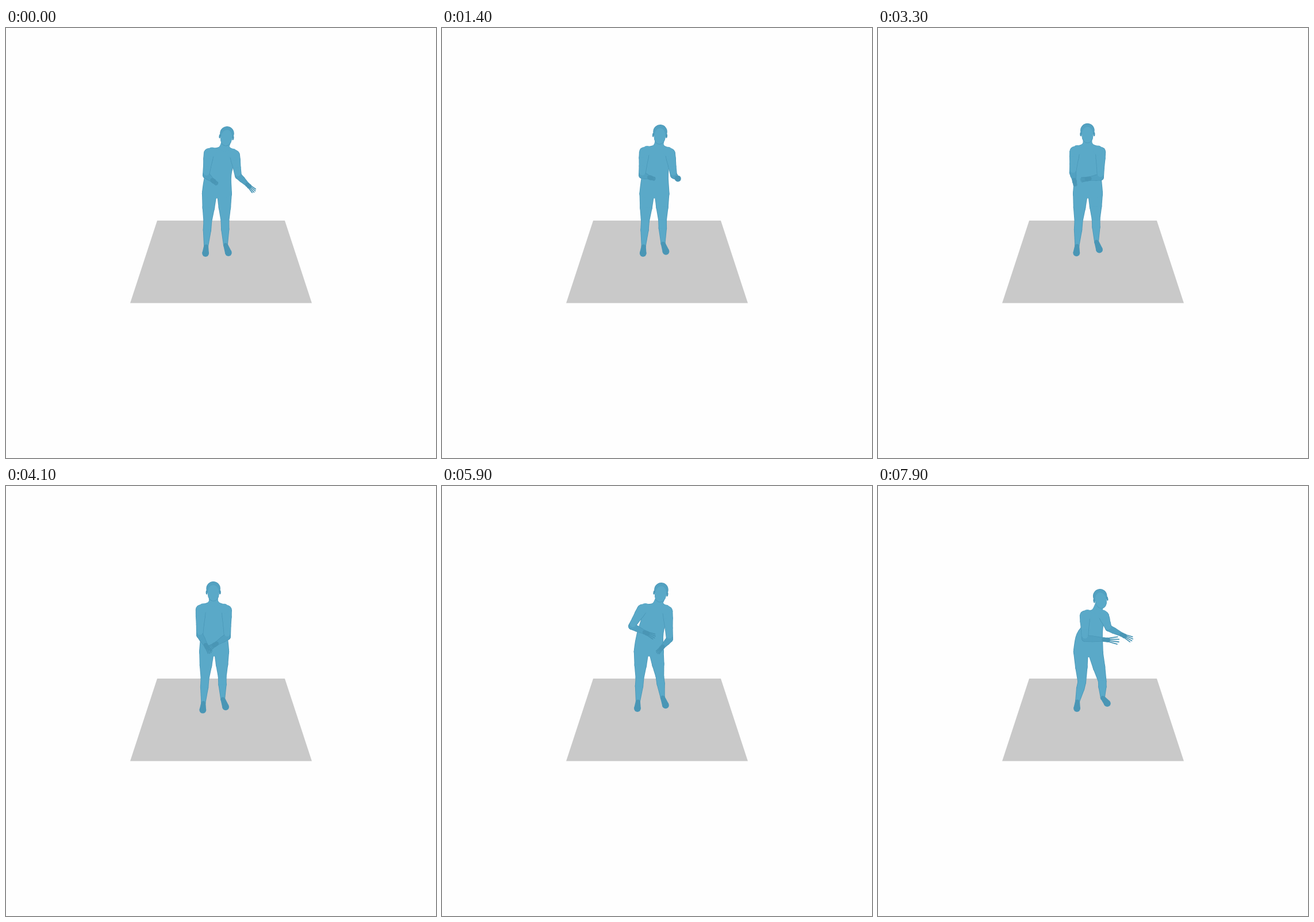
Animation, 748 px wide and 748 px high, one loop 8000 ms. Source, as an HTML page with a canvas:

```html
<!DOCTYPE html>
<html lang="en">
<head>
<meta charset="utf-8">
<title>Figure</title>
<style>
html, body { margin: 0; height: 100%; overflow: hidden; background: #fefefe; }
canvas { display: block; }
</style>
</head>
<body>
<canvas id="stage" width="748" height="748"></canvas>
<script>
const g = document.getElementById('stage').getContext('2d');
const SKIN = '#5aa9c8', RIM = '#4b98b8', SHADE = '#52a1c1', DARK = '#4a96b5';
const LOOP = 8000, STEP = 100;

// Key points of the gesture; all other joints follow by rule
const TIMES = [0, 1400, 2500, 4100, 5900, 6900, 7900];
const KEYS = {
  neck:   [[380, 207], [377, 204], [371, 202], [361, 202], [376, 204], [372, 204], [382, 215]],
  elbowL: [[348, 256], [348, 256], [341, 243], [337, 259], [330, 244], [347, 247], [360, 265]],
  tipL:   [[368, 272], [371, 263], [337, 256], [356, 291], [371, 263], [405, 257], [420, 269]],
  elbowR: [[404, 257], [403, 256], [392, 257], [385, 262], [396, 266], [396, 246], [401, 247]],
  tipR:   [[433, 285], [414, 265], [364, 247], [351, 284], [374, 291], [416, 284], [443, 268]]
};

const add = (p, x, y) => [p[0] + x, p[1] + y];
const mix = (a, b, k) => [a[0] + (b[0] - a[0]) * k, a[1] + (b[1] - a[1]) * k];
const ease = (t, from, to) => {
  const u = Math.min(1, Math.max(0, (t - from) / (to - from)));
  return u * u * (3 - 2 * u);
};

// Smooth curve through the keys; open ends keep the speed of their section
function sample(keys, t) {
  const last = TIMES.length - 1;
  let i = 0;
  while (i < last - 1 && t >= TIMES[i + 1]) i++;
  const span = TIMES[i + 1] - TIMES[i], u = (t - TIMES[i]) / span;
  return [0, 1].map(axis => {
    const at = k => keys[k][axis], a = at(i), b = at(i + 1);
    const slope = k => k < 1 || k >= last ? b - a :
      (at(k + 1) - at(k - 1)) / (TIMES[k + 1] - TIMES[k - 1]) * span;
    const m = slope(i), n = slope(i + 1);
    return a + u * (m + u * (3 * (b - a) - 2 * m - n + u * (2 * (a - b) + m + n)));
  });
}

function poseAt(t) {
  const p = {};
  for (const name in KEYS) p[name] = sample(KEYS[name], t);
  const turn = ease(t, 5500, 7900), step = ease(t, 4100, 6900);

  // The weight sways from foot to foot while the chest leans over the hips
  const sway = 364.5 + 5 * Math.cos((t - 1400) / 8200 * 2 * Math.PI);
  const lean = p.neck[0] - sway, half = 22.5 - 6 * turn;
  p.tilt = lean * .011 * (1 - 2 * turn);
  p.head = add(p.neck, lean * .3, -20);
  p.shL = add(p.neck, -lean * .35 - half, 13 - lean * .15);
  p.shR = add(p.neck, -lean * .35 + half, 14 - 3 * turn);
  p.waist = [sway + lean * .1, 255];
  p.hipL = [sway - 13, 288];
  p.hipR = [sway + 13, 288 + 3 * turn];

  p.footL = [sway - 19.8, 392 - 5 * ease(t, 2500, 5900)];
  p.footR = [sway + 20 + 13 * step, 391 - 13 * t / LOOP];
  p.ankleL = add(p.footL, 1, -12.5);
  p.ankleR = add(p.footR, -5 - 3 * turn, -14 + 4 * turn);
  for (const side of 'LR') {
    p['knee' + side] = add(mix(p['hip' + side], p['ankle' + side], .53), 5 * turn, 7 * turn);
    p['wrist' + side] = mix(p['elbow' + side], p['tip' + side], .55);
  }
  return p;
}

function ball([x, y], r, color) {
  oval(x, y, r, r, color);
}

function oval(x, y, rx, ry, color) {
  g.fillStyle = color;
  g.beginPath();
  g.ellipse(x, y, rx, ry, 0, 0, 7);
  g.fill();
}

function poly(points, color) {
  g.fillStyle = color;
  g.beginPath();
  points.forEach(p => g.lineTo(...p));
  g.fill();
}

// Closed curve with rounded corners
function blob(points, color) {
  g.fillStyle = color;
  g.beginPath();
  points.forEach((p, i) => {
    const next = mix(p, points[(i + 1) % points.length], .5);
    if (!i) g.moveTo(...mix(points.at(-1), p, .5));
    g.quadraticCurveTo(...p, ...next);
  });
  g.fill();
}

// Tapered tube through [point, radius] pairs
function limb(parts, color, inset = 0) {
  parts.forEach(([p, r], i) => {
    ball(p, r - inset, color);
    if (!i) return;
    const [q, s] = parts[i - 1];
    const angle = Math.atan2(p[1] - q[1], p[0] - q[0]) + Math.PI / 2;
    const edge = (c, d) => [c[0] + Math.cos(angle) * d, c[1] + Math.sin(angle) * d];
    poly([edge(q, s - inset), edge(p, r - inset), edge(p, inset - r), edge(q, inset - s)], color);
  });
}

function leg(p, side, color, inset) {
  const hip = p['hip' + side], knee = p['knee' + side];
  const ankle = p['ankle' + side], foot = p['foot' + side];
  limb([[hip, 13], [mix(hip, knee, .5), 10.8], [knee, 7.4],
    [mix(knee, ankle, .35), 7.2], [ankle, 4]], color, inset);
  limb([[ankle, 4], [foot, 5.9]], inset ? DARK : RIM, inset);
}

function torso({ neck, shL, shR, waist, hipL, hipR }, color, inset) {
  const half = 23 - inset, hip = 13 - inset;
  blob([
    add(neck, -8, -4), add(neck, -9, 1 + inset), add(shL, -2, -9 + inset), add(shL, inset, 13),
    add(waist, -half, 0), add(hipL, -hip, -4), add(hipL, -hip, 6),
    add(mix(hipL, hipR, .5), 0, 9), add(hipR, hip, 6), add(hipR, hip, -4),
    add(waist, half, 0), add(shR, -inset, 13), add(shR, 2, -9 + inset),
    add(neck, 9, 1 + inset), add(neck, 8, -4)
  ], color);
}

function head({ head: [x, y], neck, tilt }) {
  limb([[[x, y + 8], 8], [neck, 8]], SKIN);
  g.save();
  g.translate(x, y);
  g.rotate(tilt);
  for (const side of [-1, 1]) oval(side * 11.6, 3, 1.5, 3.6, RIM);
  oval(0, -3.5, 12.3, 12.5, RIM);
  oval(0, 6, 10, 12.5, RIM);
  oval(0, -3.5, 11.5, 11.7, SHADE);
  oval(0, 4, 9.8, 13.8, SKIN);
  g.restore();
}

function hand(wrist, tip) {
  const angle = Math.atan2(tip[1] - wrist[1], tip[0] - wrist[0]);
  const reach = Math.hypot(tip[0] - wrist[0], tip[1] - wrist[1]);
  const palm = mix(wrist, tip, .25);
  limb([[wrist, 3.7], [palm, reach < 8 ? 5.5 : 4]], DARK);
  g.strokeStyle = DARK;
  g.lineWidth = 1.8;
  g.lineCap = 'round';
  for (let i = -1.5; i < 2; i++) {
    const a = angle + i * .24, len = reach * (.75 - Math.abs(i) * .06);
    g.beginPath();
    g.moveTo(palm[0] - Math.sin(angle) * i * 1.8, palm[1] + Math.cos(angle) * i * 1.8);
    g.lineTo(palm[0] + Math.cos(a) * len, palm[1] + Math.sin(a) * len);
    g.stroke();
  }
}

function arm(p, side) {
  const shoulder = p['sh' + side], elbow = p['elbow' + side], wrist = p['wrist' + side];
  const upper = [[shoulder, 9], [mix(shoulder, elbow, .25), 8.5],
    [mix(shoulder, elbow, .6), 7], [elbow, 6]];
  const fore = [[elbow, 6], [mix(elbow, wrist, .4), 5.4], [wrist, 3.6]];
  limb(upper, RIM);
  limb(upper, SKIN, .8);
  ball(mix(shoulder, p.neck, .2), 8.4, SKIN);
  limb(fore, RIM);
  limb(fore, SHADE, .8);
  ball(mix(elbow, shoulder, .12), 5.2, SKIN);
  hand(wrist, p['tip' + side]);
}

function draw(t) {
  const p = poseAt(t);
  g.fillStyle = '#fefefe';
  g.fillRect(0, 0, 748, 748);
  poly([[263, 335], [485, 335], [532, 478.5], [216, 478.5]], '#c9c9c9');
  for (const [color, inset] of [[RIM, 0], [SKIN, .9]]) {
    leg(p, 'R', color, inset);
    leg(p, 'L', color, inset);
    torso(p, color, inset);
  }
  arm(p, 'R');
  arm(p, 'L');
  head(p);
}

function tick() {
  const t = performance.now() % LOOP;
  draw(Math.floor(t / STEP) * STEP);
  requestAnimationFrame(tick);
}
tick();
</script>
</body>
</html>
```
